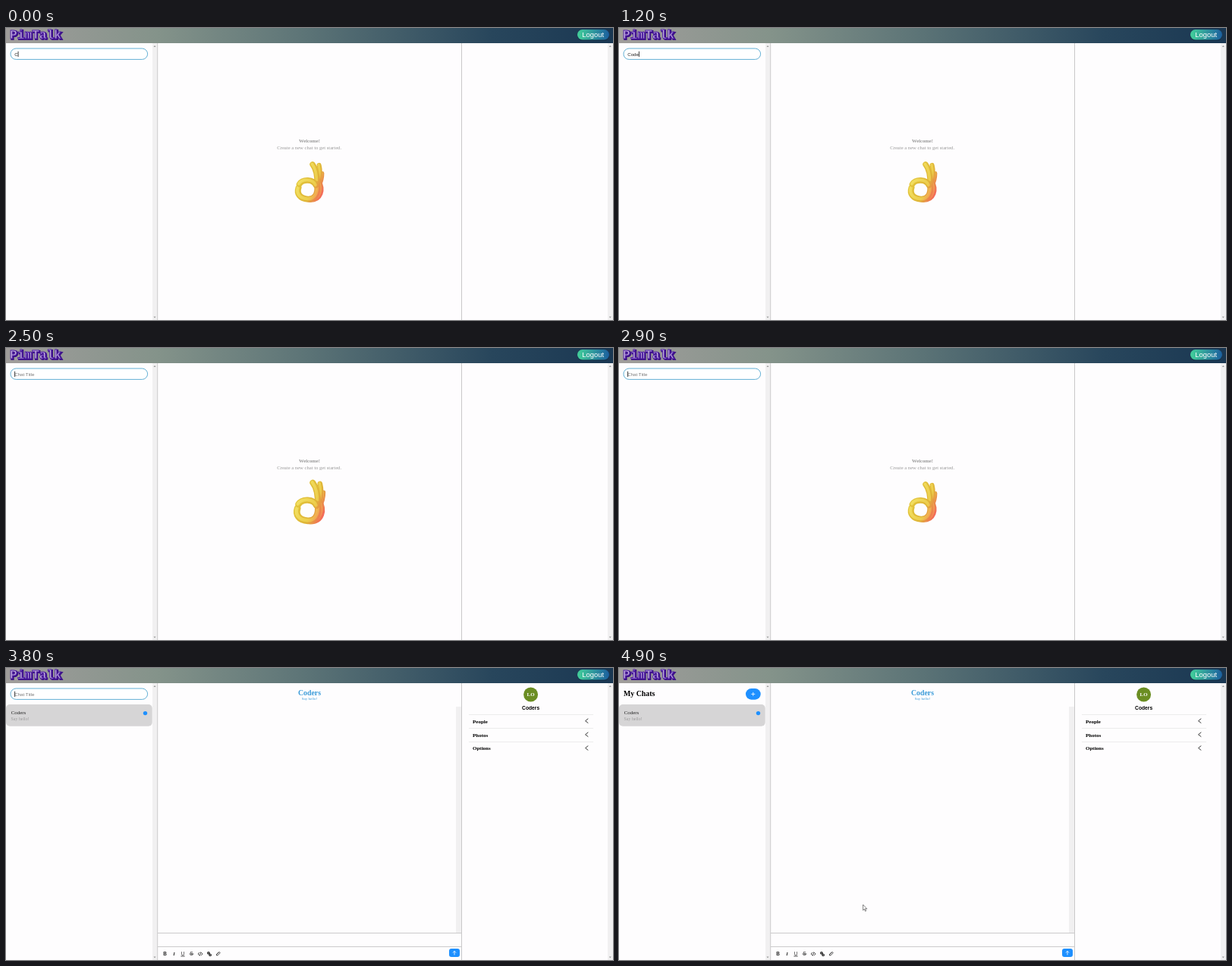
Write an HTML page that moves like this. It is 800x385 px and loops after 5 s.

```html
<!DOCTYPE html>
<html lang="en">
<head>
<meta charset="utf-8">
<title>Chat demo</title>
<style>
html, body { margin: 0; width: 100%; height: 100%; overflow: hidden; background: #fefdfe; }
svg { display: block; width: 800px; height: 385px; }
text { white-space: pre; font-family: "Liberation Serif", serif; }
.sans { font-family: "Liberation Sans", sans-serif; }
.mono { font-family: "Liberation Mono", monospace; font-weight: bold; font-size: 16.2px; }
.bold { font-weight: bold; }
.mid { text-anchor: middle; }
.line { fill: none; stroke-linecap: round; stroke-linejoin: round; }
</style>
</head>
<body>
<svg viewBox="0 0 800 385">
  <defs>
    <linearGradient id="bar">
      <stop stop-color="#a09d9b"/><stop offset=".25" stop-color="#84938a"/>
      <stop offset=".5" stop-color="#5b7376"/><stop offset=".8" stop-color="#28465c"/>
      <stop offset="1" stop-color="#1a3752"/>
    </linearGradient>
    <linearGradient id="pill">
      <stop stop-color="#43d09a"/><stop offset="1" stop-color="#1c5f9f"/>
    </linearGradient>
    <linearGradient id="skin" gradientUnits="userSpaceOnUse" x1="384" y1="196" x2="420" y2="212">
      <stop stop-color="#e3c93c"/><stop offset=".62" stop-color="#dfb437"/>
      <stop offset="1" stop-color="#f4695a"/>
    </linearGradient>
    <linearGradient id="shine" gradientUnits="userSpaceOnUse" x1="384" y1="196" x2="420" y2="212">
      <stop stop-color="#f3e365"/><stop offset=".65" stop-color="#eccd4c"/>
      <stop offset="1" stop-color="#f58a58"/>
    </linearGradient>
  </defs>

  <rect width="800" height="20" fill="url(#bar)"/>
  <g class="mono">
    <text class="mono" x="6.2" y="15.4" fill="#3d1188" stroke="#3d1188" stroke-width="2">PimTalk</text>
    <text class="mono" x="5" y="14.2" fill="#c5b3dc" stroke="#4f1fa6" stroke-width=".9">PimTalk</text>
  </g>
  <rect x="753" y="3" width="42" height="14" rx="7" fill="#10283c" opacity=".45"/>
  <rect x="753" y="2" width="42" height="13.5" rx="6.75" fill="url(#pill)"/>
  <text class="sans mid" x="773.7" y="12" font-size="9.4" fill="#fff">Logout</text>

  <g fill="#f1f0f1">
    <rect x="193" y="20" width="6" height="365"/>
    <rect x="793" y="20" width="7" height="365"/>
  </g>
  <path d="M194.5 25l1.5-2 1.5 2zM194.5 380.5l1.5 2 1.5-2zM794.8 25l1.5-2 1.5 2zM794.8 380.5l1.5 2 1.5-2z" fill="#999"/>
  <path d="M199.7 20V385M600.5 20V385" stroke="#c9c8c9"/>

  <g id="field">
    <rect x="6" y="27" width="180.6" height="14.4" rx="7.2" fill="#fff" stroke="#62b0d5"/>
    <text id="entry" class="sans" x="11.2" y="36.7" font-size="6.2"></text>
    <path id="caret" d="M.4 30.8v7.2" stroke="#111" stroke-width=".8"/>
  </g>

  <g id="welcome">
    <g class="mid" font-size="6.64" fill="#999">
      <text class="bold" x="400" y="151">Welcome!</text>
      <text x="399.7" y="160">Create a new chat to get started.</text>
    </g>
    <g id="hand" class="line"></g>
  </g>

  <g id="chat">
    <rect x="0" y="48" width="192.7" height="28.7" rx="5" fill="#d6d5d6"/>
    <text x="6.8" y="60.6" font-size="6.8" fill="#222">Coders</text>
    <text x="6.6" y="69.2" font-size="5.9" fill="#9c9b9c">Say hello!</text>
    <circle cx="183.5" cy="59.6" r="2.7" fill="#1e90ff"/>

    <g class="mid" fill="#3a9bd9">
      <text class="bold" x="400" y="36" font-size="9.8">Coders</text>
      <text x="400" y="42" font-size="5">Say hello!</text>
    </g>
    <rect x="593" y="51" width="7" height="298" fill="#f1f0f1"/>
    <path d="M200 349.5H600M200 367.5H600" stroke="#cbcacb"/>
    <g class="mid sans" font-size="6.4" fill="#222">
      <text class="sans bold mid" x="209.5" y="379.2">B</text>
      <text class="mid" x="221.5" y="379.2" font-style="italic" font-weight="bold">I</text>
      <text class="sans mid" x="233" y="378.6">U</text>
      <text class="sans mid" x="244.5" y="379.2">S</text>
    </g>
    <g class="line" stroke="#222" stroke-width=".8">
      <path d="M230.8 380h4.4M242 377h5"/>
      <path d="M254.7 375.3l-1.6 1.7 1.6 1.7M257.5 375.3l1.6 1.7-1.6 1.7M256.6 374.8l-1 4.4"/>
      <path d="M277.8 377.2l2.5-2.3q1.5-.8 1.8.7l-3 3.2q-1.8.9-1.9-.9l2.9-2.7"/>
      <g stroke-width="1.1">
        <rect x="265.6" y="374.6" width="2.6" height="2.3" rx="1"/>
        <rect x="267.8" y="377.2" width="2.6" height="2.3" rx="1"/>
        <path d="M267.3 376.2l1.5 1.6"/>
      </g>
    </g>
    <rect x="584" y="370" width="14" height="11" rx="3" fill="#1e90ff"/>
    <path class="line" d="M591 378v-4.6m-1.8 1.8l1.8-1.8 1.8 1.8" stroke="#fff" stroke-width=".8"/>

    <circle cx="691.6" cy="35" r="9.5" fill="#6b8e23"/>
    <text class="mid bold" x="691.6" y="36.6" font-size="6.9" fill="#fff">LO</text>
    <text class="sans mid bold" x="691.6" y="55.4" font-size="6.7">Coders</text>
    <path d="M610 61.5H774M610 79.5H774M610 97.5H774" stroke="#ececec"/>
    <g class="bold" font-size="7">
      <text x="615" y="72.6">People</text>
      <text x="615" y="90.5">Photos</text>
      <text x="615" y="108.4">Options</text>
    </g>
    <path class="line" d="M767 67l-3.4 2.7 3.4 2.7M767 85l-3.4 2.7 3.4 2.7M767 102.8l-3.4 2.7 3.4 2.7" stroke="#222" stroke-width=".9"/>
  </g>

  <g id="heading">
    <text class="bold" x="6" y="37" font-size="9.9">My Chats</text>
    <rect x="167" y="27" width="19.7" height="14.7" rx="7.3" fill="#1e90ff"/>
    <path d="M174.3 34.4h5M176.8 31.9v5" stroke="#fff" stroke-width=".8"/>
  </g>

  <path id="mouse" d="M0 0V7.4L1.7 5.9 2.9 8.7 4.1 8.2 2.9 5.5H5.2Z" fill="#fff" stroke="#333" stroke-width=".6"/>
</svg>
<script>
const $ = id => document.getElementById(id);
const show = (id, on) => $(id).style.display = on ? "" : "none";

// Finger and palm tubes, back to front: [path, width]
const tubes = [
  ["M416.8 191.5Q417 200 412 210", 5],
  ["M412.6 181Q415 190 412.5 204", 6],
  ["M411 202C418 213 414 226 401 226", 8],
  ["M404 180Q410.5 188 410 206", 7.4],
  ["M410 206C412 220 406 226 398 225.6C387 225 383 218 385.6 210.5", 8],
  ["M386.6 206C391 199 405 199 408.5 207.5", 7.6]
];
$("hand").innerHTML = tubes.map(([d, w]) =>
  `<path d="${d}" stroke="url(#skin)" stroke-width="${w}"/>
   <path d="${d}" stroke="url(#shine)" stroke-width="${w * .5}" transform="translate(-.6 -.5)"/>`).join("");

const TITLE = "Coders";
const KEYS = [0, 300, 600, 1000, 1300, 1600];
const SENT = 2400, OPENED = 3800, CLOSED = 3900, BLINK = 530;
const ROUTE = [[4100, 195, 47], [4300, 325, 105], [4600, 395, 209], [4700, 388, 250], [4900, 321.6, 312]];

function pulse(t) {
  const wave = (1 + Math.cos((t - 250) / 1200 * 2 * Math.PI)) / 2;
  const x = Math.min(1, Math.max(0, (wave - .5) / .4));
  return .972 + .13 * x * x * (3 - 2 * x);
}

function along(t) {
  const i = Math.max(1, ROUTE.findIndex(p => p[0] >= t));
  const [a, b] = [ROUTE[i - 1], ROUTE[i]];
  const k = (t - a[0]) / (b[0] - a[0]);
  return [a[1] + (b[1] - a[1]) * k, a[2] + (b[2] - a[2]) * k];
}

function draw(now) {
  const t = Math.floor(now % 5000 / 100) * 100;
  const pressed = KEYS.filter(k => k <= t);
  const typing = t < SENT;
  const entry = $("entry");
  entry.textContent = typing ? TITLE.slice(0, pressed.length) : "Chat Title";
  entry.setAttribute("fill", typing ? "#222" : "#777");

  const lastKey = typing ? pressed[pressed.length - 1] : SENT;
  const caretX = 11.2 + (typing ? entry.getComputedTextLength() : 0);
  $("caret").setAttribute("transform", `translate(${caretX})`);
  show("caret", (t - lastKey) % (2 * BLINK) < BLINK);

  show("welcome", t < OPENED);
  show("chat", t >= OPENED);
  show("field", t < CLOSED);
  show("heading", t >= CLOSED);
  $("hand").setAttribute("transform", `translate(400 203.3) scale(${pulse(t)}) translate(-400 -203.3)`);

  const moving = t >= ROUTE[0][0];
  show("mouse", moving);
  if (moving) $("mouse").setAttribute("transform", `translate(${along(t)})`);
}

function loop() {
  draw(performance.now());
  requestAnimationFrame(loop);
}
loop();
</script>
</body>
</html>
```
